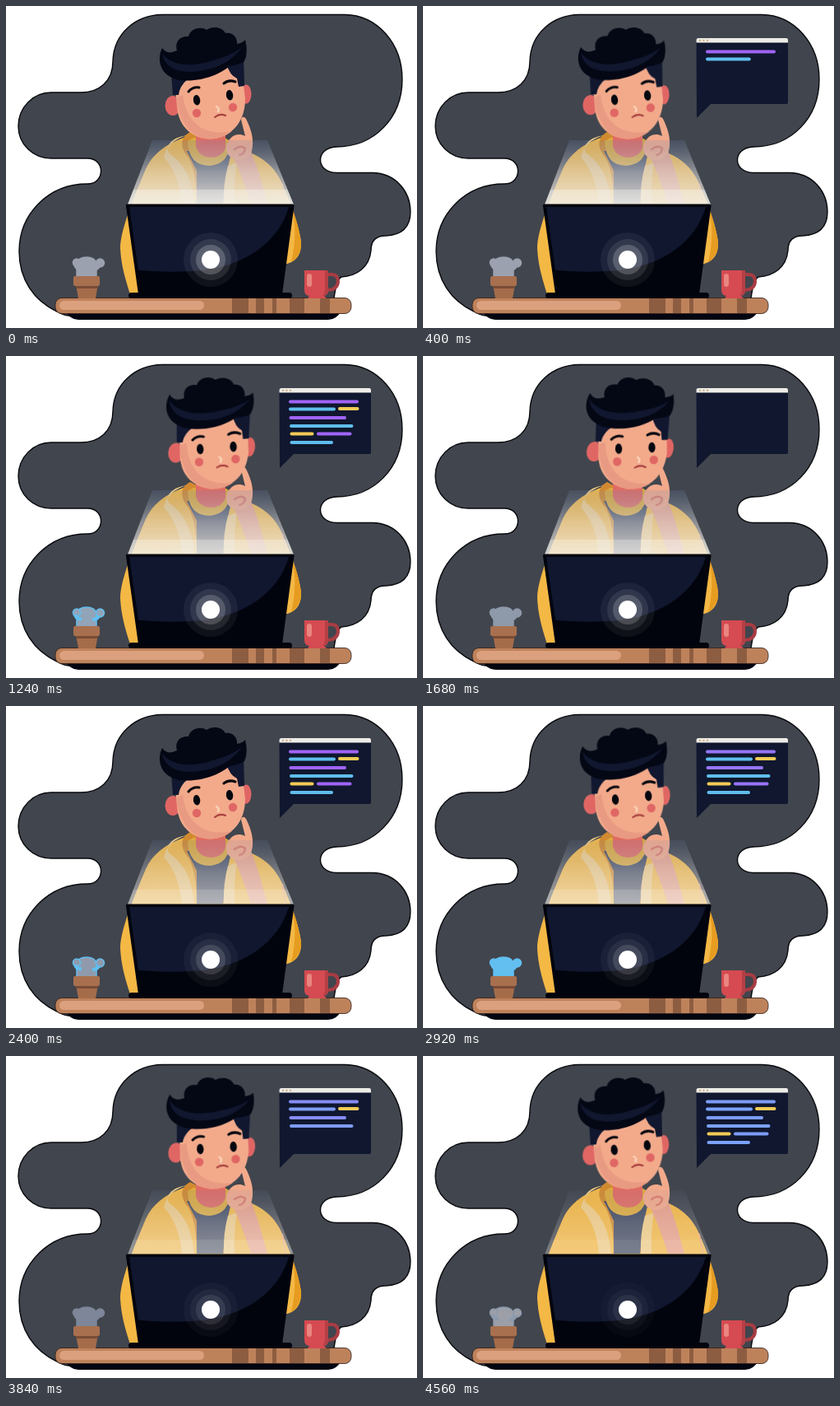
An HTML page without scripts for the animation above (4800 ms loop, 500 by 391 pixels).

```html
<!DOCTYPE html>
<html lang="en">
<head>
<meta charset="utf-8">
<title>Thinking at the laptop</title>
<style>
  @property --typed { syntax: "<number>"; inherits: true; initial-value: 0; }

  html, body { margin: 0; width: 100%; height: 100%; overflow: hidden; background: #fff; }
  svg { display: block; width: 500px; height: 391px; }

  .head, .bubble, .code, .beam, .glow, .red, .cactus, .violet, .sky {
    animation: 4800ms linear infinite;
  }

  .head { transform-origin: 250px 168px; animation-name: tilt; animation-timing-function: ease-in-out; }
  @keyframes tilt {
    0%, 50% { transform: rotate(0deg); }
    16.67%, 60.83% { transform: rotate(2.1deg); animation-timing-function: linear; }
    33.5%, 35% { transform: rotate(6.3deg); }
    72% { transform: rotate(6.2deg); }
    80% { transform: rotate(4.5deg); animation-timing-function: linear; }
    95%, 100% { transform: rotate(.7deg); }
  }

  .bubble { transform-origin: 333px 136px; animation-name: pop; }
  @keyframes pop {
    0%, .8% { transform: scale(0); }
    4.17%, 100% { transform: scale(1); }
  }

  /* --typed counts finished rows; each line knows its row (--at) and share (--len) */
  .code { animation-name: type; fill: none; stroke-width: 4; stroke-linecap: round; }
  .code path {
    stroke-dasharray: 1px 3px;
    stroke-dashoffset: calc(1.1px * (1 - clamp(0, (var(--typed) - var(--at)) / var(--len, 1), 1)));
  }
  @keyframes type {
    0%, 4.17%, 34.17%, 35%, 69.17%, 70% { --typed: 0; }
    19.17%, 34.16%, 50%, 69.16%, 85%, 100% { --typed: 6; }
  }

  .violet { stroke: #a064f8; animation-name: violet; }
  .sky { stroke: #5fbdec; animation-name: sky; }
  .gold { stroke: #f3cb55; }
  @keyframes violet {
    0%, 50% { stroke: #a064f8; }
    60.83% { stroke: #9675fa; }
    80% { stroke: #858cf6; }
    95%, 100% { stroke: #7c9cfb; }
  }
  @keyframes sky {
    0%, 60.83% { stroke: #5fbdec; }
    80% { stroke: #7d9bf3; }
    95%, 100% { stroke: #7aa2fb; }
  }

  .beam, .glow { animation-name: dim; }
  @keyframes dim {
    0% { opacity: 1; }
    16.67% { opacity: .95; }
    35% { opacity: .9; }
    50%, 60.83% { opacity: .68; }
    80% { opacity: .52; }
    95%, 100% { opacity: .35; }
  }

  .red { fill: var(--red); animation-name: dull; animation-timing-function: step-end; }
  .skin { --red: #e06664; --dull: #c98a64; }
  .mug { --red: #d54b51; --dull: #b0714c; }
  @keyframes dull {
    0%, 20% { fill: var(--red); }
    14% { fill: var(--dull); }
  }

  .cactus { animation-name: cactus; animation-timing-function: step-end; stroke-width: 1.5; }
  @keyframes cactus {
    0% { fill: #9ca1b0; stroke: #9ca1b0; }
    14% { fill: #92a4b8; stroke: #62bff0; }
    30% { fill: #8e99aa; stroke: #8e99aa; }
    46% { fill: #8f9bac; stroke: #62bff0; }
    56% { fill: #62bff0; stroke: #62bff0; }
    70% { fill: #7d8799; stroke: #7d8799; }
    90%, 100% { fill: #9c9fa8; stroke: #8b9aae; }
  }
</style>
</head>
<body>
<svg viewBox="0 0 500 391">
  <defs>
    <linearGradient id="light" x1="0" y1="0" x2="0" y2="1">
      <stop offset="0" stop-color="#7188b4" stop-opacity=".2"/>
      <stop offset=".25" stop-color="#a9b2c4" stop-opacity=".38"/>
      <stop offset=".5" stop-color="#d3d2d2" stop-opacity=".58"/>
      <stop offset=".77" stop-color="#e5e1dc" stop-opacity=".74"/>
      <stop offset=".77" stop-color="#eeece7" stop-opacity=".84"/>
      <stop offset="1" stop-color="#f2f0e9" stop-opacity=".93"/>
    </linearGradient>
    <clipPath id="lid"><path d="M150 244H346.500L332 349H165Z"/></clipPath>
  </defs>

  <!-- backdrop -->
  <path fill="#41454d" stroke="#08090d" stroke-width="1.400" d="M190 10.500H412C452 11 482 46 482 89C482 136 448 171 402 171C376 172 376 202 402 202.500H446C473 203 492 224 492 250C492 268 482 278 462 279C450 279 444 285 444 297C442 318 426 328 408 329Q402 332 399 355V376H76Q68 375 62 371C34 358 16 332 16 298C16 252 52 216 99 216C121 216 121 185 99 185H55C33 185 15 168 15 146C15 123 33 105 55 105H91C114 105 130 91 130 67C131 33 158 11 190 10.500Z"/>

  <!-- desk -->
  <path fill="#030510" d="M72 370H408Q402 381 392 381H88Q78 381 72 370Z"/>
  <rect x="60" y="354.500" width="360" height="19" rx="8" fill="#be825b" stroke="#2a1b18" stroke-width=".8"/>
  <rect x="65" y="358" width="176" height="11" rx="5.500" fill="#dba07e"/>
  <path fill="#8d5d41" d="M275 355h20v18h-20zM304 355h10v18h-10zM324 355h5v18h-5zM345 355h18v18h-18zM382 355h12v18h-12z"/>

  <!-- plant -->
  <g class="cactus">
    <path d="M86 329V312Q88 305 98 305Q108 305 110 312V329Z"/>
    <circle cx="86" cy="311.500" r="4.500"/>
    <circle cx="114.500" cy="312" r="5"/>
    <path d="M84 314Q86 320 92 319M113 315Q112 320 105 320" fill="none" stroke-width="4"/>
  </g>
  <path fill="#a56c4a" d="M85 338H112L109 355H88Z"/>
  <path fill="#794c36" d="M85 339H112L111 343H86Z"/>
  <rect x="82" y="328" width="32" height="12" rx="2" fill="#a8704e"/>

  <!-- mug -->
  <g class="mug">
    <path fill="none" stroke="#a83c43" stroke-width="4" d="M390 326H396Q404 326 404 335Q403 345 390 345"/>
    <path class="red" d="M363 321H392V345Q392 351 387 352L390 355H367L369 352Q363 351 363 345Z"/>
    <path fill="#b53f46" d="M388 321H392V345Q392 351 385 352Q388 349 388 345Z"/>
    <rect x="366" y="325" width="6" height="16" rx="3" fill="#e98580"/>
  </g>

  <!-- jacket and shirt -->
  <path fill="#f4b845" d="M216 160C194 168 178 180 170 198C160 222 139 270 139 294C140 316 146 334 151 350H320L330 313H342C354 310 360 300 359 286C356 264 346 238 336 216C328 196 312 182 286 174Z"/>
  <path fill="#e69c20" d="M346 242C353 262 353 286 347 311Q360 302 359 286Q355 262 346 242Z"/>
  <path fill="#d28a30" d="M224 153C210 160 213 174 222 184Q232 202 232 240H266Q270 210 272 178Z"/>
  <path fill="#414a62" d="M220 176L232 200V240H264L268 204L274 178Z"/>
  <path fill="#f1cc86" d="M220 157C200 160 193 171 199 179C214 190 226 206 229 240H214C212 216 204 196 192 184Q196 164 220 157Z"/>
  <path fill="#f1cc86" d="M270 194Q264 216 265 240H278Q277 214 281 190Z"/>
  <path fill="#dcaa3f" d="M221 164Q222 194 248 194Q272 192 273 164L266 160H228Z"/>
  <path fill="#df6c64" d="M231 150H267V172Q263 184 249 184Q234 183 231 170Z"/>

  <!-- head -->
  <g class="head skin">
    <ellipse class="red" cx="203" cy="121" rx="9.500" ry="12"/>
    <ellipse class="red" cx="292" cy="107" rx="6.500" ry="11.500"/>
    <path fill="#f2aa8b" d="M205 88L208 122C210 148 228 161.500 249 161.500C275 160 291 140 291 113L286 70L240 78Z"/>
    <path fill="#e99a82" d="M207 112C211 144 228 161.500 249 161.500Q264 161 275 152C248 158 220 148 215 108Z"/>
    <path fill="#10172f" d="M201 82L203 108H210Q211 97 222 88ZM268 70Q272 84 281 88L283 98L290 97L289 62Z"/>
    <path fill="#040714" d="M190 51C183 65 187 86 212 90C238 93 262 82 272 73Q284 71 290 67Q295 57 291 41Q288 45 281 46C282 38 275 31 267 33C263 25 251 24 244 29C236 24 224 28 222 37C211 36 205 44 208 54Q196 60 190 51Z"/>
    <path fill="#10172f" d="M190 58C194 78 214 82 236 79C258 76 276 66 287 50C270 62 260 63 246 68C222 74 202 72 190 58Z"/>
    <path d="M222 104Q227 98 235 99M265 94Q271 89 279 92" fill="none" stroke="#05070f" stroke-width="3" stroke-linecap="round"/>
    <g fill="#05070f">
      <ellipse cx="232" cy="114.300" rx="4.200" ry="6.300" transform="rotate(-8 232 114)"/>
      <ellipse cx="272" cy="108.300" rx="4.200" ry="6.300" transform="rotate(-8 272 108)"/>
    </g>
    <circle class="red" cx="232" cy="130" r="5.200"/>
    <circle class="red" cx="276" cy="123" r="5.200"/>
    <path d="M256 122Q260 124 258 128" fill="none" stroke="#fbd3b8" stroke-width="2.500" stroke-linecap="round"/>
    <path d="M254 135Q260 130 267 133" fill="none" stroke="#a8403f" stroke-width="2" stroke-linecap="round"/>
  </g>

  <!-- hand on chin -->
  <path fill="#e9a08a" d="M275 180L298 176L309 206L337 216L341 240H298Q287 206 275 180Z"/>
  <path fill="#f4b845" d="M303 186Q326 196 335 214L340 240H318Z"/>
  <path fill="#f2aa8b" d="M286 138C287 133 291 134 293 139C297 148 300 156 300 164C301 179 295 187 283 187C271 186 265 176 269 167C273 158 281 153 291 158Z"/>
  <path d="M278 174Q286 168 291 173Q290 180 284 181" fill="none" stroke="#dd7e70" stroke-width="2.500" stroke-linecap="round"/>

  <path class="beam" fill="url(#light)" d="M178 163H318L350 241H148Z"/>

  <!-- laptop -->
  <path fill="#02040d" d="M148 240.500H348.500Q351 240.500 350.500 243L336 350H161L146 243Q145.500 240.500 148 240.500Z"/>
  <rect x="149" y="348" width="199" height="7" rx="3.500" fill="#02040d"/>
  <path clip-path="url(#lid)" fill="#10172f" d="M150 244H344C332 286 292 315 238 321Q200 325 155 320Z"/>
  <g class="glow" fill="#fff">
    <circle cx="249" cy="308" r="33" opacity=".06"/>
    <circle cx="249" cy="308" r="25" opacity=".1"/>
    <circle cx="249" cy="308" r="18" opacity=".2"/>
  </g>
  <circle cx="249" cy="308" r="11" fill="#fff"/>

  <!-- code bubble -->
  <g class="bubble">
    <path fill="#10172f" d="M332.500 41Q332.500 39 335 39H442Q444 39 444 41V117Q444 119 442 119H350L333 136Z"/>
    <path fill="#ecebe6" d="M332.500 44.500V41Q332.500 39 335 39H442Q444 39 444 41V44.500Z"/>
    <g fill="#c99a62">
      <circle cx="337" cy="41.700" r="1"/>
      <circle cx="341.500" cy="41.700" r="1"/>
      <circle cx="346" cy="41.700" r="1"/>
    </g>
    <g class="code">
      <path class="violet" pathLength="1" style="--at:0" d="M346 55.500H427"/>
      <path class="sky" pathLength="1" style="--at:1;--len:.7" d="M346 64.500H399"/>
      <path class="gold" pathLength="1" style="--at:1.7;--len:.3" d="M406 64H427.500"/>
      <path class="violet" pathLength="1" style="--at:2" d="M346.500 75H412"/>
      <path class="sky" pathLength="1" style="--at:3" d="M347 85H420.500"/>
      <path class="gold" pathLength="1" style="--at:4;--len:.4" d="M347.500 94.500H372.500"/>
      <path class="violet" pathLength="1" style="--at:4.4;--len:.6" d="M380 94.500H418.500"/>
      <path class="sky" pathLength="1" style="--at:5" d="M347.500 105H396"/>
    </g>
  </g>
</svg>
</body>
</html>
```
